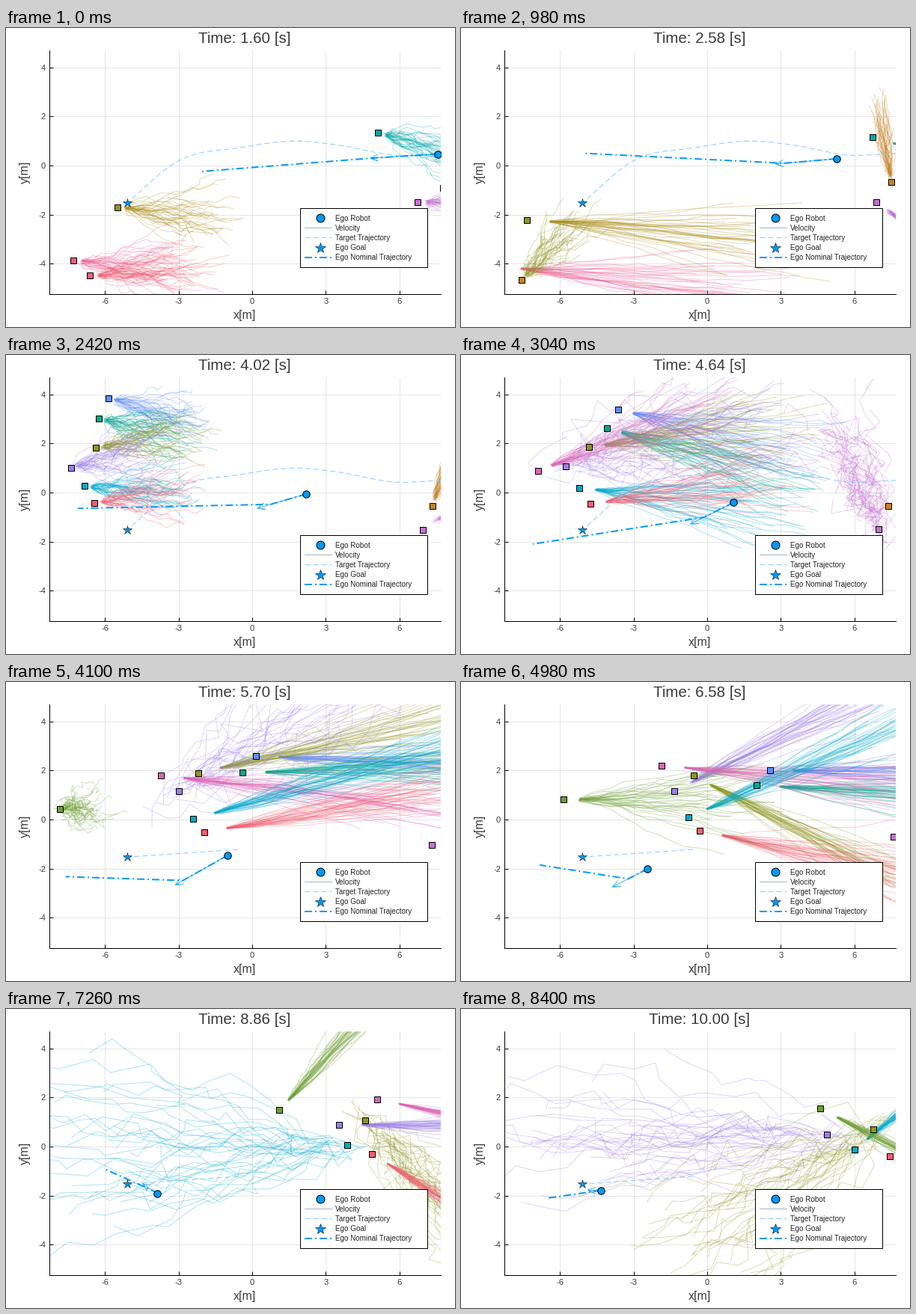
A matplotlib script for the animation above (8420 ms loop, 600 by 400 pixels).

```python
import numpy as np
import matplotlib.pyplot as plt
from matplotlib.animation import FuncAnimation
from matplotlib.collections import LineCollection
from matplotlib.patches import Rectangle

plt.rcParams["font.family"] = "Liberation Sans"
plt.rcParams["axes.unicode_minus"] = False

W, H, DPI = 600, 400, 100
PX = 72 / DPI
FRAMES, STEP_MS = 421, 20
T0, DT = 1.60, 0.02
SCALE = 32.8                      # pixels per metre
LEFT, RIGHT, TOP, BOTTOM = 58, 581, 30, 356
OX, OY = 329, 184                 # pixel position of the world origin
SAMPLES, STEPS = 36, 13
RESAMPLE = 0.4                    # seconds between new predictions
WARMUP = 1.6                      # seconds until predictions reach full length
TIMES = np.array([1.6, 3.3, 4.64, 5.7, 7.58, 8.86, 10.0])

BLUE, SKY, INK = "#009AFA", "#87CDF5", "#3a3a3a"
GOLD, TEAL, ROSE, BROWN = "#AC8D18", "#00A9AD", "#ED5E93", "#C68225"
SEA, OLIVE, CYAN, VIOLET = "#00A98D", "#8E971E", "#00A9CC", "#9B7FE9"
AZURE, RED, PINK, GREEN = "#618DF6", "#F06073", "#DD65B6", "#6C9F33"
PURPLE = "#C371D2"


def hermite(times, pts, slopes, t):
    """Cubic path through timed points, straight beyond both ends."""
    c = np.clip(t, times[0], times[-1])
    j = min(np.searchsorted(times, c, "right") - 1, len(times) - 2)
    h = times[j + 1] - times[j]
    s = (c - times[j]) / h
    p = ((1 + 2 * s) * (1 - s) ** 2 * pts[j] + s * (1 - s) ** 2 * h * slopes[j]
         + s * s * (3 - 2 * s) * pts[j + 1] + s * s * (s - 1) * h * slopes[j + 1])
    edge = 0 if t < c else -1
    return p + slopes[edge] * (t - c)


def lerp(times, rows, t):
    return np.array([np.interp(t, times, col) for col in rows.T])


class Walker:
    """Pedestrian on a path, with a fan of predictions along its heading."""

    count = 0

    def __init__(self, color, first, path, aim, since, until=99, lost=(), fan=None):
        self.color, self.fan_color = color, fan or color
        self.times = TIMES[first:first + len(path)]
        self.path = np.array(path, float)
        self.slopes = np.gradient(self.path, self.times, axis=0)
        self.aim = np.radians(aim)
        self.since, self.until = since, until
        self.lost = np.array(lost)
        Walker.count += 1
        self.seed = Walker.count

    def pos(self, t):
        return hermite(self.times, self.path, self.slopes, t)

    def visible(self, t):
        return self.since <= t < self.until and -8.6 < self.pos(t)[0] < 8.1

    def fan(self, t):
        rng = np.random.default_rng([self.seed, int(t / RESAMPLE + 1e-6)])
        pos = self.pos(t)
        angle = np.interp(t, self.times, self.aim)
        ahead = np.array([np.cos(angle), np.sin(angle)])
        aside = np.array([-ahead[1], ahead[0]])

        # Predictions are short and vague at first, wide and jagged when lost
        ramp = min(1, (t - self.since) / WARMUP)
        lost = np.exp(-((t - self.lost) / 0.5) ** 2).max(initial=0)
        doubt = max(lost, 1 - ramp)
        reach = ramp * (3 + 9 * ahead[0] ** 2)
        focus = np.clip(1 - pos[0] / 9, 0.15, 1)
        spread = reach * (0.05 * focus + 0.11 * doubt)

        u = np.linspace(0, 1, STEPS)
        side, bend, shift = rng.normal(size=(3, SAMPLES, 1))
        start = reach * (0.08 + 0.1 * lost * shift)
        along = start + reach * rng.uniform(0.6, 1.05, (SAMPLES, 1)) * u
        across = spread * (side * u ** (1 - 0.5 * lost) + 0.5 * bend * u ** 2)
        drift, jag = rng.normal(size=(2, SAMPLES, STEPS, 2))
        drift[:, 0] *= 0.4
        noise = (0.05 + 0.1 * doubt) * drift.cumsum(axis=1) + 0.25 * lost * jag
        return pos + along[..., None] * ahead + across[..., None] * aside + noise


low = [(-6.63, -4.49), (-8.22, -4.8)]
EARLY, LATE = 1.0, 3.5

walkers = [
    Walker(TEAL, 0, [(5.12, 1.34), (7.9, 1.0)], [-15, -15], EARLY),
    Walker(OLIVE, 0, [(-5.5, -1.7), (-8.7, -2.6)], [-4, -4], EARLY, fan=GOLD),
    Walker(RED, 0, [(-7.3, -3.88), (-9.4, -4.3)], [-5, -5], EARLY, fan=ROSE),
    Walker(RED, 0, low, [2, 2], EARLY, until=2.4),
    Walker(BROWN, 0, low, [50, 50], 1.8, lost=[3.3], fan=OLIVE),
    Walker(BROWN, 0, [(7.77, -.92), (7.35, -.55), (7.38, -.56)],
           [0, 170, -12], EARLY, until=5.2, lost=[3.3]),
    Walker(PURPLE, 0, [(6.75, -1.5), (6.98, -1.48), (6.98, -1.48), (7.32, -1.05)],
           [-5, -62, 115, 0], EARLY, lost=[3.3, 4.64]),
    Walker(AZURE, 2, [(-3.64, 3.38), (.15, 2.58), (4.92, 1.38)],
           [-13, -2, 2], LATE),
    Walker(SEA, 2, [(-4.1, 2.62), (-.4, 1.92), (4.48, .82)], [-14, 1, -8], LATE),
    Walker(OLIVE, 2, [(-4.82, 1.86), (-2.18, 1.9), (1.27, 1.54), (4.6, 1.07), (6.76, .7)],
           [7, 13, -75, -45, -150], LATE, lost=[7.58, 8.86, 10]),
    Walker(VIOLET, 2, [(-5.77, 1.07), (-3, 1.16), (.44, 1.08), (3.53, .88), (4.88, .5)],
           [15, 30, 24, 0, 180], LATE, lost=[4.64, 5.7, 10]),
    Walker(PINK, 2, [(-6.9, .88), (-3.73, 1.8), (.4, 2.3), (5.08, 1.93)],
           [22, -6, -4, -12], LATE),
    Walker(CYAN, 2, [(-5.2, .18), (-2.4, .02), (.93, .18), (3.87, .05), (6, -.13)],
           [-5, 16, 34, 180, 39], LATE, lost=[8.86]),
    Walker(RED, 2, [(-4.77, -.47), (-1.95, -.52), (1.52, -.34), (4.87, -.3), (7.43, -.4)],
           [8, 10, -37, -32, -28], LATE),
    Walker(GREEN, 3, [(-7.85, .43), (-3.29, 1.2), (1.1, 1.48), (4.6, 1.57)],
           [0, 0, 48, -28], 5.5),
]

# Ego robot at each of TIMES: position, velocity, end of its plan
ego_p = np.array([(7.56, .47), (3.72, .11), (1.07, -.41), (-1, -1.46),
                  (-3.29, -2.12), (-3.86, -1.92), (-4.34, -1.81)])
ego_v = np.array([(-2.74, -.17), (-2.28, -.24), (-1.75, -.87), (-2.13, -1.2),
                  (-.6, -.2), (-.6, .4), (-.52, .04)])
plan_end = np.array([(-2.04, -.24), (-7.1, 1.04), (-7.1, -2.1), (-7.6, -2.33),
                     (-5.94, -1.31), (-6, -.92), (-6.47, -2.1)])

GOAL = (-5.1, -1.53)
REPLAN = 5.5
bends = np.array([GOAL, (-3, .2), (-.5, .73), (1.85, 1), (3.4, .85),
                  (5.9, .42), (7.7, .5)])
bend_slopes = np.gradient(bends[:, 1], bends[:, 0])
first_route = np.array([(x, hermite(bends[:, 0], bends[:, 1], bend_slopes, x))
                        for x in np.linspace(GOAL[0], 7.7, 40)])[::-1]
second_route = np.array([(-.58, -1.22), GOAL])


def arrow(p, v, head=0.32, spread=0.42):
    tip, a = p + v, np.arctan2(v[1], v[0]) + np.pi
    barbs = [tip + head * np.array([np.cos(a + s), np.sin(a + s)])
             for s in (-spread, spread)]
    return np.array([p, tip, barbs[0], tip, barbs[1]])


fig = plt.figure(figsize=(W / DPI, H / DPI), dpi=DPI, facecolor="white")
ax = fig.add_axes([LEFT / W, 1 - BOTTOM / H, (RIGHT - LEFT) / W, (BOTTOM - TOP) / H])
ax.set_xlim((LEFT - OX) / SCALE, (RIGHT - OX) / SCALE)
ax.set_ylim((OY - BOTTOM) / SCALE, (OY - TOP) / SCALE)
ax.set_xticks([-6, -3, 0, 3, 6])
ax.set_yticks([-4, -2, 0, 2, 4])
ax.set_axisbelow(True)
ax.grid(color="black", alpha=0.1, lw=PX)
ax.tick_params(direction="in", length=5 * PX, width=PX, pad=5 * PX,
               labelsize=8, labelcolor=INK)
for side in ("top", "right"):
    ax.spines[side].set_visible(False)
for side in ("left", "bottom"):
    ax.spines[side].set_linewidth(PX)

DASH = dict(color=SKY, lw=PX, ls=(0, (7, 4)))
DASHDOT = dict(color=BLUE, lw=2 * PX, ls=(0, (5, 2, 1, 2)), dash_capstyle="butt")
DOT = dict(color=BLUE, marker="o", ls="", mec="black", mew=PX)
STAR = dict(color=BLUE, marker="*", ls="", mec="black", mew=0.5 * PX)

fans = LineCollection([], linewidths=PX, alpha=0.32, zorder=2)
ax.add_collection(fans)
squares = ax.scatter([], [], s=(8 * PX) ** 2, marker="s", edgecolors="black",
                     linewidths=PX, zorder=3)
route, = ax.plot([], [], zorder=4, **DASH)
velocity, = ax.plot([], [], color=BLUE, lw=PX, alpha=0.75, zorder=5)
plan, = ax.plot([], [], zorder=6, **DASHDOT)
robot, = ax.plot([], [], ms=9.5 * PX, zorder=7, **DOT)
ax.plot(*GOAL, ms=12 * PX, zorder=7, **STAR)

# Labels and legend, laid out in pixels
page = fig.add_axes([0, 0, 1, 1])
page.set(xlim=(0, W), ylim=(H, 0))
page.axis("off")
title = page.text(319, 19.5, "", size=14.8, color=INK, ha="center")
page.text(319, 389, "x[m]", size=11.5, color=INK, ha="center")
page.text(25, 193, "y[m]", size=11.5, color=INK, ha="center", va="center", rotation=90)
page.add_patch(Rectangle((393, 241), 169.5, 79, fc="white", ec="black", lw=PX))
legend = [
    ("Ego Robot", (420,), dict(DOT, ms=11 * PX)),
    ("Velocity", (398.5, 435), dict(color="#9FB3BE", lw=PX)),
    ("Target Trajectory", (398.5, 435), DASH),
    ("Ego Goal", (420,), dict(STAR, ms=14 * PX)),
    ("Ego Nominal Trajectory", (398.5, 435), DASHDOT),
]
for row, (label, xs, style) in enumerate(legend):
    y = 254 + 13.2 * row
    page.plot(xs, [y] * len(xs), **style)
    page.text(439.5, y + 3.6, label, size=7.1, color="#222222")


def update(i):
    t = T0 + DT * i
    title.set_text(f"Time: {t:.2f} [s]")

    seen = [w for w in walkers if w.visible(t)]
    fans.set_segments([line for w in seen for line in w.fan(t)])
    fans.set_color([w.fan_color for w in seen for _ in range(SAMPLES)])
    squares.set_offsets(np.array([w.pos(t) for w in seen]).reshape(-1, 2))
    squares.set_facecolor([w.color for w in seen])

    p, v = hermite(TIMES, ego_p, ego_v, t), lerp(TIMES, ego_v, t)
    corner = p + 0.35 * np.hypot(*v) * v
    robot.set_data([p[0]], [p[1]])
    velocity.set_data(*arrow(p, v).T)
    plan.set_data(*np.array([p, corner, lerp(TIMES, plan_end, t)]).T)
    route.set_data(*(first_route if t < REPLAN else second_route).T)
    return title, fans, squares, robot, velocity, plan, route


anim = FuncAnimation(fig, update, frames=FRAMES, interval=STEP_MS,
                     repeat=True, repeat_delay=0, blit=False)
plt.show()
```
